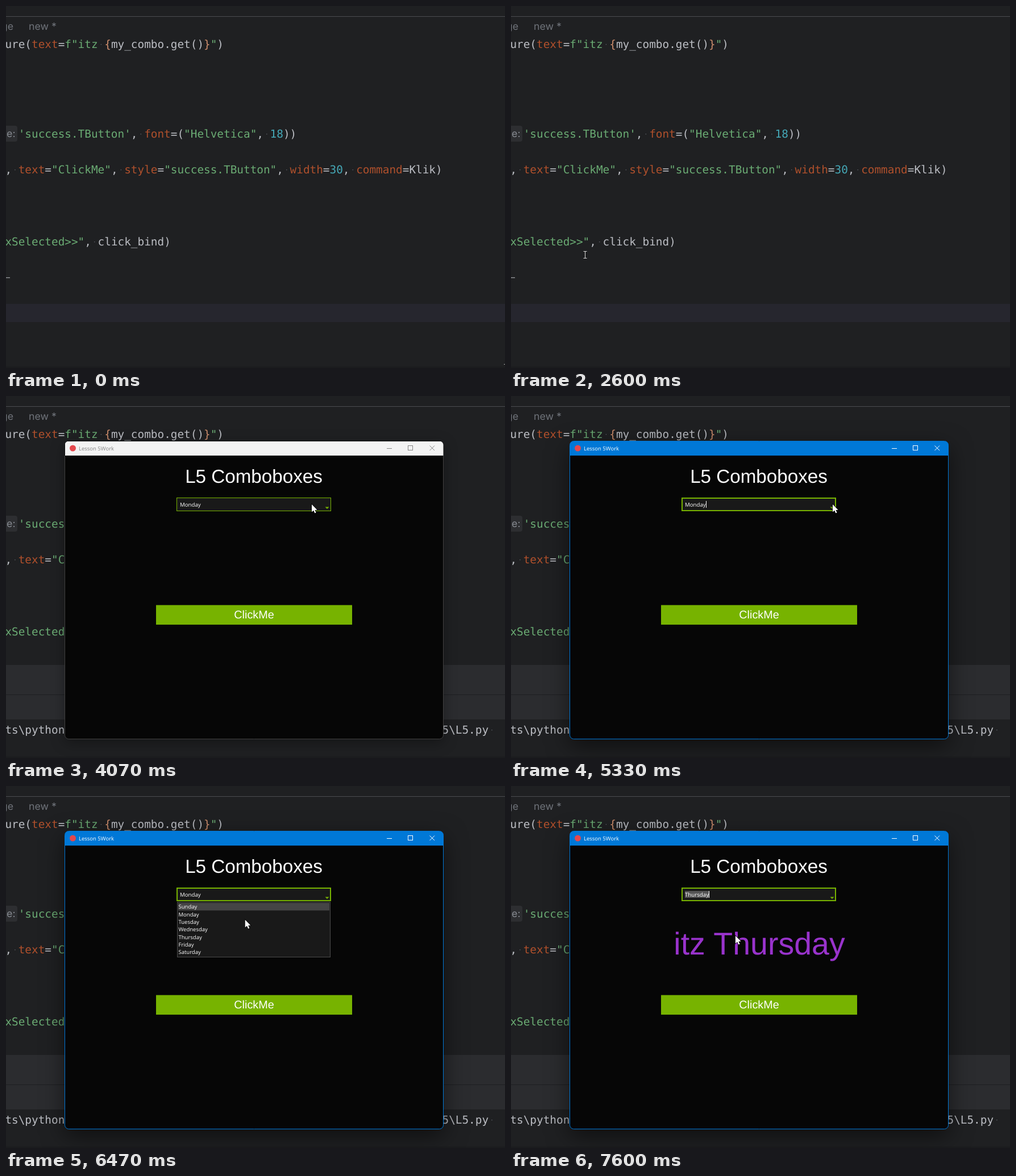
Animation of 878x638 px, one loop 8000 ms. Source, as an HTML page with a canvas:

```html
<!DOCTYPE html>
<html lang="en">
<head>
<meta charset="utf-8">
<title>Combobox demo</title>
<style>
html, body { margin: 0; width: 878px; height: 638px; overflow: hidden; background: #1f2022; }
canvas { display: block; }
</style>
</head>
<body>
<canvas id="stage" width="878" height="638"></canvas>
<script>
const ctx = document.getElementById('stage').getContext('2d');
const LOOP = 8000, TICK = 200 / 3;
const MONO = '19.37px "DejaVu Sans Mono", monospace';
const UI = '"Open Sans", sans-serif';
const ARIAL = '"Liberation Sans", sans-serif';
const INTER = '17.8px Inter, sans-serif';
const PLAIN = '#bcbec4', STR = '#6aab73', ARG = '#b0502c', NUM = '#45a9b8', BRACE = '#cf8e6d';
const GREEN = '#77b300', FIELD = '#191919', BLUE = '#0078d7';
const DAYS = ['Sunday', 'Monday', 'Tuesday', 'Wednesday', 'Thursday', 'Friday', 'Saturday'];

// Moments of the hard changes
const IBEAM = 2595, OPEN = 2665, ENTER = 2925, HOVER = 3725, FOCUS = 4395,
      CARET_OFF = 4995, CLICK = 5325, DROP = 5925, PICK = 6525, CHOSEN = 7595;

// Pointer path: time, x, y
const PATH = [
  [2933, 36, 626], [3200, 190, 420], [3467, 400, 190], [3600, 465, 160], [3733, 510, 192],
  [3867, 520, 195], [4067, 538, 191], [5133, 538, 191], [5333, 566, 191],
  [6400, 566, 191], [6467, 420, 236], [7067, 395, 264], [LOOP, 395, 264]
];

const CODE = [
  [-1.6, 74, [PLAIN, 'ure('], [ARG, 'text'], [PLAIN, '='], [STR, 'f"itz '], [BRACE, '{'],
    [PLAIN, 'my_combo.get()'], [BRACE, '}'], [STR, '"'], [PLAIN, ')']],
  [21.7, 232, [STR, "'success.TButton'"], [PLAIN, ', '], [ARG, 'font'], [PLAIN, '=('],
    [STR, '"Helvetica"'], [PLAIN, ', '], [NUM, '18'], [PLAIN, '))']],
  [-1.6, 295, [PLAIN, ', '], [ARG, 'text'], [PLAIN, '='], [STR, '"ClickMe"'], [PLAIN, ', '],
    [ARG, 'style'], [PLAIN, '='], [STR, '"success.TButton"'], [PLAIN, ', '], [ARG, 'width'],
    [PLAIN, '='], [NUM, '30'], [PLAIN, ', '], [ARG, 'command'], [PLAIN, '=Klik)']],
  [-1.6, 422, [STR, 'xSelected>>"'], [PLAIN, ', click_bind)']]
];

function box(x, y, w, h, color) {
  ctx.fillStyle = color;
  ctx.fillRect(x, y, w, h);
}

function frame(x, y, w, h, color, line) {
  ctx.strokeStyle = color;
  ctx.lineWidth = line;
  ctx.strokeRect(x + line / 2, y + line / 2, w - line, h - line);
}

function text(str, x, y, font, color, align = 'left') {
  ctx.font = font;
  ctx.fillStyle = color;
  ctx.textAlign = align;
  ctx.fillText(str, x, y);
}

function shape(points, fill, stroke) {
  ctx.beginPath();
  points.forEach(([x, y]) => ctx.lineTo(x, y));
  ctx.closePath();
  if (stroke) {
    ctx.strokeStyle = stroke;
    ctx.lineWidth = 1.5;
    ctx.stroke();
  }
  ctx.fillStyle = fill;
  ctx.fill();
}

// Code line with faint dots on its spaces
function codeLine([x, y, ...tokens]) {
  for (const [color, str] of tokens) {
    text(str, x, y, MONO, color);
    const step = ctx.measureText('0').width;
    for (const ch of str) {
      if (ch === ' ') box(x + step / 2 - 0.7, y - 7, 1.4, 1.4, '#5c5f66');
      x += step;
    }
  }
}

function editor(t) {
  box(0, 0, 878, 638, '#1f2022');
  box(0, 18, 878, 1, '#4b4c4f');
  text('ge', 13, 42, INTER, '#6f737a', 'right');
  text('new *', 40, 42, INTER, '#6f737a');
  box(0, 525, 878, 32, '#26262e');
  ctx.beginPath();
  ctx.roundRect(-10, 211, 30, 28, 4);
  ctx.fillStyle = '#2d2e31';
  ctx.fill();
  text('e:', 16.5, 231, INTER, '#868a91', 'right');
  CODE.forEach(codeLine);
  box(0, 478, 7, 1.5, '#8a8c90');
  if (t >= OPEN) {
    box(0, 474, 878, 96, '#2b2c2f');
    box(0, 526, 878, 1, '#1e1f22');
    box(0, 570, 878, 68, '#1f2022');
    codeLine([-1.6, 595, [PLAIN, 'ts\\python']]);
    codeLine([767.5, 595, [PLAIN, '5\\L5.py ']]);
  }
  box(0, 636, 878, 1, '#17181a');
  if (t < 325) box(876, 631, 2, 1, '#a0a0a0');
}

function titleBar(active) {
  box(104, 80, 666, 25, active ? BLUE : '#f3f3f3');
  ctx.beginPath();
  ctx.arc(117.5, 92, 5.5, 0, 7);
  ctx.fillStyle = '#e5484d';
  ctx.fill();
  const ink = active ? '#fff' : '#858585';
  text('Lesson 5Work', 128, 95.5, '9.5px ' + UI, ink);
  box(670, 92, 9, 1, ink);
  frame(707, 87, 9, 9, ink, 1);
  ctx.beginPath();
  ctx.moveTo(745.5, 87.5); ctx.lineTo(754, 96);
  ctx.moveTo(754, 87.5); ctx.lineTo(745.5, 96);
  ctx.stroke();
}

function combo(t) {
  const day = t >= CHOSEN ? 'Thursday' : 'Monday';
  const font = '9.7px ' + UI;
  box(300, 179, 272, 24, FIELD);
  frame(300, 179, 272, 24, GREEN, t >= FOCUS ? 2 : 1);
  ctx.font = font;
  const end = 306 + ctx.measureText(day).width;
  if (t >= CHOSEN) box(306, 185, end - 306, 12, '#555');
  text(day, 306, 194.7, font, '#fff');
  const caret = (t >= FOCUS && t < CARET_OFF) || (t >= CLICK && t < DROP) || t >= CHOSEN;
  if (caret) box(Math.round(end), 185, 1, 12, '#fff');
  shape([[561.5, 195.5], [568.5, 195.5], [565, 199]], t >= HOVER ? GREEN : '#fff');
}

function list(t, pointerY) {
  const row = 13.35;
  const hot = t < PICK ? 0 : Math.floor((pointerY - 206) / row);
  box(301, 204, 270, 98, FIELD);
  frame(301, 204, 270, 98, '#4b4b4b', 1);
  box(303, 206 + hot * row, 266, row, '#454545');
  DAYS.forEach((day, i) => text(day, 303.5, 216.2 + i * row, '9.5px ' + UI, '#fff'));
}

function appWindow(t, pointerY) {
  const active = t >= FOCUS;
  const outline = () => {
    ctx.beginPath();
    ctx.roundRect(103.5, 79.5, 666, 525, 7);
  };
  ctx.save();
  ctx.shadowColor = active ? 'rgba(0,0,0,.55)' : 'rgba(0,0,0,.35)';
  ctx.shadowBlur = active ? 40 : 24;
  ctx.shadowOffsetY = active ? 12 : 6;
  outline();
  ctx.fillStyle = '#060606';
  ctx.fill();
  ctx.restore();

  ctx.save();
  outline();
  ctx.clip();
  titleBar(active);
  ctx.restore();
  if (active) {
    outline();
    ctx.strokeStyle = BLUE;
    ctx.lineWidth = 1;
    ctx.stroke();
  } else {
    ctx.save();
    ctx.beginPath();
    ctx.rect(100, 105, 680, 510);
    ctx.clip();
    outline();
    ctx.strokeStyle = '#414141';
    ctx.lineWidth = 1;
    ctx.stroke();
    ctx.restore();
  }

  text('L5 Comboboxes', 436, 153.3, '33.2px ' + ARIAL, '#fff', 'center');
  combo(t);
  box(264, 368.5, 345, 34.5, GREEN);
  text('ClickMe', 436.5, 392, '19.8px ' + ARIAL, '#fff', 'center');
  if (t >= CHOSEN) text('itz Thursday', 437, 297, '55.5px ' + ARIAL, '#9933cc', 'center');
  else if (t >= DROP) list(t, pointerY);
}

function pointerAt(t) {
  const time = Math.floor((t + 5) / TICK) * TICK;
  const i = Math.max(1, PATH.findIndex(p => p[0] >= time));
  const [t0, x0, y0] = PATH[i - 1], [t1, x1, y1] = PATH[i];
  const k = Math.min(1, Math.max(0, (time - t0) / (t1 - t0)));
  return [x0 + (x1 - x0) * k, y0 + (y1 - y0) * k];
}

function iBeam(x, y) {
  const ink = '#d8d8d8';
  box(x - 0.5, y - 6, 1, 12, ink);
  box(x - 3, y - 7, 6, 1, ink);
  box(x - 3, y + 5, 6, 1, ink);
}

function arrow(x, y) {
  const outline = [[0, 0], [0, 13.5], [3.2, 10.8], [5.4, 15.6], [7.6, 14.6], [5.5, 10], [9.6, 9.7]];
  shape(outline.map(([dx, dy]) => [x + dx, y + dy]), '#fff', '#000');
}

function draw(t) {
  const [x, y] = pointerAt(t);
  editor(t);
  if (t >= OPEN) appWindow(t, y);
  if (t >= IBEAM && t < OPEN) iBeam(130.5, 439);
  if (t >= ENTER) (x < 104 || y > 604 ? iBeam : arrow)(x, y);
}

ctx.textRendering = 'geometricPrecision';
const start = performance.now();
function tick() {
  draw((performance.now() - start) % LOOP);
  requestAnimationFrame(tick);
}
tick();
</script>
</body>
</html>
```
